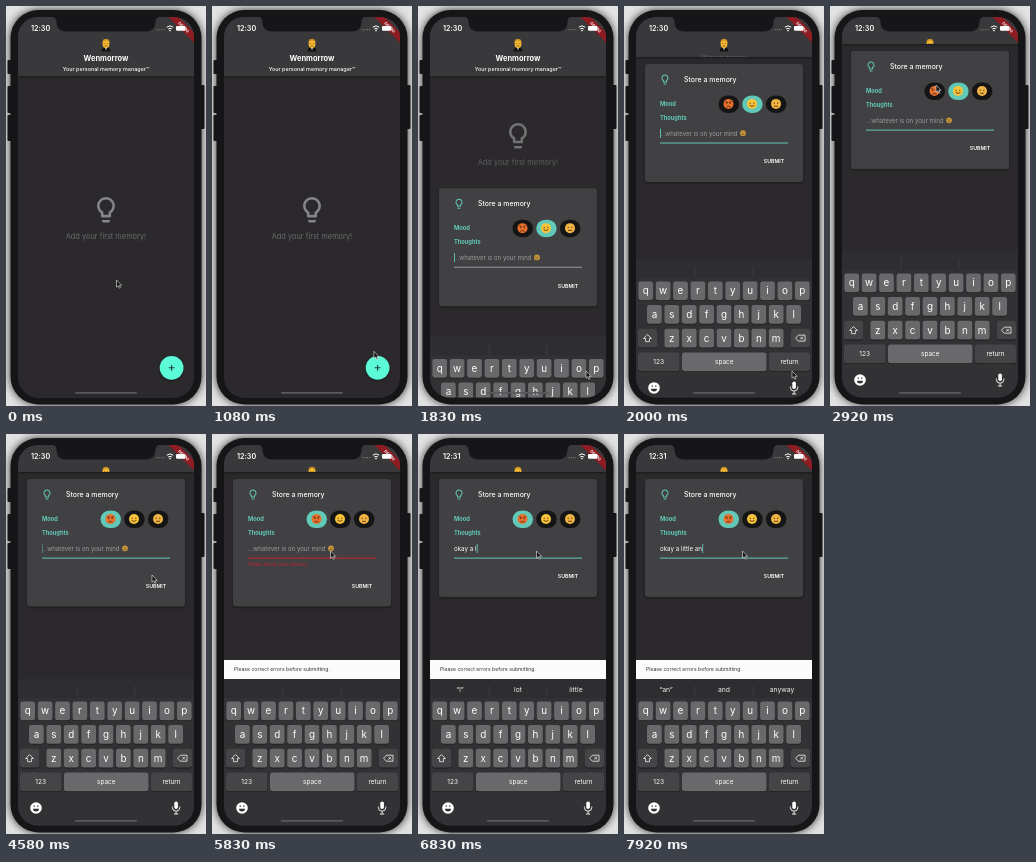
An HTML page for the animation above (8 s loop, 200 px wide and 400 px high).

```html
<!DOCTYPE html>
<html lang="en">
<head>
<meta charset="utf-8">
<title>Memory manager</title>
<style>
  html, body { margin: 0; width: 100%; height: 100%; overflow: hidden; background: #e2e2e2; }
  svg { display: block; width: 100vw; height: 100vh; }
  text { font-family: Inter, Roboto, sans-serif; white-space: pre; }
</style>
</head>
<body>
<svg id="stage" viewBox="0 0 200 400"></svg>
<script>
const TEAL = '#62c9b8', BODY = '#2b292b', BAR = '#39383a', RED = '#c9252d', CASE = '#161517';
const BULB = 'M9 21c0 .55.45 1 1 1h4c.55 0 1-.45 1-1v-1H9v1zm3-19C8.14 2 5 5.14 5 9c0 2.38 1.19 4.47 3 5.74V17c0 .55.45 1 1 1h6c.55 0 1-.45 1-1v-2.26c1.81-1.27 3-3.36 3-5.74 0-3.86-3.14-7-7-7zm2.85 11.1l-.85.6V16h-4v-2.3l-.85-.6C7.8 12.16 7 10.63 7 9c0-2.76 2.24-5 5-5s5 2.24 5 5c0 1.63-.8 3.16-2.15 4.1z';

// Text is placed by the middle of its capitals
const text = (x, mid, size, str, fill = '#fff', more = '') =>
  `<text x="${x}" y="${mid + size * .36}" font-size="${size}" fill="${fill}" ${more}>${str}</text>`;
const MID = 'text-anchor="middle" ', BOLD = 'font-weight="700" ', SEMI = 'font-weight="600" ';
const rect = (x, y, w, h, fill, r = 0, more = '') =>
  `<rect x="${x}" y="${y}" width="${w}" height="${h}" rx="${r}" fill="${fill}" ${more}/>`;
const bulb = (x, y, s, fill) =>
  `<path d="${BULB}" fill="${fill}" transform="translate(${x} ${y}) scale(${s}) translate(-12 -12)"/>`;

const face = (x, y, r, fill, mouth, brows = '') =>
  `<g transform="translate(${x} ${y}) scale(${r / 5})" stroke="#4a2508" stroke-width=".8" fill="none" stroke-linecap="round">
    <circle r="5" fill="${fill}" stroke="none"/>
    <path d="M-1.8 -1v.7M1.8 -1v.7${mouth}${brows}"/></g>`;
const SMILE = 'M-2.2 1.6Q0 3.6 2.2 1.6', FROWN = 'M-1.8 3Q0 1.4 1.8 3', FLAT = 'M-1.6 2.3H1.6';

const MOODS = [
  face(104.5, 40, 5, '#e8702f', FROWN, 'M-3 -2.4L-1 -1.4M3 -2.4L1 -1.4'),
  face(128, 40, 5, '#f9c53b', SMILE),
  face(152, 40, 5, '#f0b545', FLAT)
];
const pills = MOODS.map((m, i) =>
  rect(94.5 + 23.7 * i, 31.5, 20.5, 17.5, '#161516', 8.7) +
  rect(94.5 + 23.7 * i, 31.5, 20.5, 17.5, TEAL, 8.7, `id="pill${i}" opacity="0"`) + m).join('');

function keyboard() {
  const key = (x, y, w, label, size, fill = '#69686a') =>
    rect(x, y + .8, w, 18.8, '#1c1b1c', 2.4) + rect(x, y, w, 18.8, fill, 2.4) +
    text(x + w / 2, y + 9.2, size, label, '#fff', MID);
  const row = (letters, x, y) =>
    [...letters].map((c, i) => key(x + i * 17.4, y, 14.8, c, 9.9)).join('');
  const DARK = '#454446';
  return rect(12, 245, 176, 160, '#323133') + rect(12, 245, 176, 19, '#2e2d2f') +
    '<path d="M71 252v11M129 252v11" stroke="#454446" stroke-width=".7"/>' +
    [42, 100, 158].map((x, i) =>
      text(x, 256, 6.8, '', '#f2f2f2', `${MID} id="hint${i}"`)).join('') +
    row('qwertyuiop', 14.3, 267.5) + row('asdfghjkl', 23, 291) + row('zxcvbnm', 40.4, 314.8) +
    key(14, 314.8, 19, '', 6, DARK) + key(167, 314.8, 19, '', 6, DARK) +
    key(14, 338.5, 41.5, '123', 6.6, DARK) + key(58, 338.5, 84.5, 'space', 6.4) +
    key(145, 338.5, 41, 'return', 6.4, DARK) +
    `<g fill="none" stroke="#fff" stroke-width=".75" stroke-linejoin="round">
      <path d="M23.5 320.6l3.9 3.9h-2v3.2h-3.8v-3.2h-2z"/>
      <path d="M171.6 324.2l2.8-3h6.6v6h-6.6zM176.3 322.8l2.8 2.8M179.1 322.8l-2.8 2.8"/>
    </g>
    <circle cx="30" cy="374" r="5.8" fill="#fff"/>
    <path d="M28.2 371.4v1.6M31.8 371.4v1.6" stroke="#323133" stroke-width="1"/>
    <path d="M27 374.8h6a3 2.7 0 0 1-6 0z" fill="#323133"/>
    <rect x="168.3" y="367.5" width="3.6" height="7.6" rx="1.8" fill="#fff"/>
    <path d="M166.4 372.5v1a3.7 3.7 0 0 0 7.4 0v-1M170.1 377.3v2.6M168 380h4.2" fill="none" stroke="#fff" stroke-width=".9"/>`;
}

const butler = `<g transform="translate(100 39)">
  <path d="M-4.4 6.6Q-4.4 3 -1.6 2.6h3.2Q4.4 3 4.4 6.6z" fill="#121112"/>
  <path d="M-1 2.6h2L0 5.4z" fill="#ddd"/>
  <ellipse cy="-1.4" rx="3.4" ry="4.6" fill="#f2b733"/>
  <path d="M-3.5 -2.2Q-3.6 -6.2 0 -6.2T3.5 -2.2Q2.4 -4.8 0 -4.8T-3.5 -2.2z" fill="#c58a25"/>
  <path d="M-1.4 -2v.8M1.4 -2v.8M-1.2 .9h2.4" stroke="#5a340c" stroke-width=".7"/></g>`;

const card = `<g id="card">
  <rect id="sheet" x="21" y="0" width="158" height="118" rx="3" fill="#414042" filter="url(#soft)"/>
  ${bulb(41, 15.5, .5, TEAL)}
  ${text(60, 15.8, 6.95, 'Store a memory', '#fff', 'font-weight="500"')}
  ${text(36, 39.8, 5.7, 'Mood', TEAL, BOLD)}${pills}
  ${text(36, 54.3, 5.7, 'Thoughts', TEAL, BOLD)}
  <g id="empty">${text(36, 69.6, 6.1, '...whatever is on your mind', '#9b9a9c')}
    ${face(119, 69.3, 2.9, '#c99a3c', FLAT)}</g>
  ${text(36, 69.6, 6.2, '', '#fff', 'id="typed"')}
  <rect id="caret" x="36" y="65" width=".9" height="9" fill="${TEAL}"/>
  <rect id="line" x="36" y="78.6" width="128" height="1"/>
  ${text(36, 85.8, 4.5, 'Please tell me your memory.', RED, 'id="error"')}
  <g id="submit">${text(150, 97.6, 5.2, 'SUBMIT', '#fff', MID + SEMI)}</g>
</g>`;

const status = `
  <path d="M162.5 11h10L188 26.5V36.5z" fill="#8f1c22"/>
  ${text(0, 0, 3.8, 'DEBUG', '#fff', MID + BOLD + 'transform="translate(177.7 21.3) rotate(45)"')}
  ${text(25, 22.4, 7.2, '12:30', '#fff', SEMI + 'id="clock"')}
  <path d="M150.5 23.6h8" stroke="#777" stroke-width="1.1" stroke-dasharray="1.1 1.1"/>
  <path d="M160.8 21.2q3.2-2.8 6.4 0M162.2 23q1.8-1.5 3.6 0" stroke="#fff" stroke-width="1" fill="none"/>
  <circle cx="164" cy="24.6" r=".8" fill="#fff"/>
  ${rect(170, 20, 9.5, 4.8, '#fff', 1.2)}${rect(180, 21.5, .8, 1.8, '#ccc', .3)}
  ${rect(69, 386, 62, 1.8, '#59585a', .9)}`;

const sideButtons = [[1.5, 54, 14], [1.5, 80, 27], [1.5, 109, 26], [193, 79, 44]]
  .map(([x, y, h]) => rect(x, y, 5.5, h, CASE, 1)).join('');

stage.innerHTML = `
<defs>
  <clipPath id="screen"><rect x="12" y="11" width="176" height="380.5" rx="20"/></clipPath>
  <clipPath id="barClip"><rect id="barArea" x="12" y="11" width="176" height="59"/></clipPath>
  <filter id="soft" x="-10%" y="-10%" width="120%" height="125%" color-interpolation-filters="sRGB">
    <feDropShadow dx="0" dy="1" stdDeviation="1.2" flood-opacity=".4"/></filter>
  <filter id="glow" x="-10%" y="-10%" width="120%" height="120%" color-interpolation-filters="sRGB">
    <feDropShadow dx="0" dy="0" stdDeviation="4" flood-opacity=".8"/></filter>
</defs>
${rect(4.5, 4, 191, 394.5, CASE, 28, 'filter="url(#glow)"')}
${sideButtons}
<g clip-path="url(#screen)">
  ${rect(12, 11, 176, 381, BODY)}
  <g id="intro">${bulb(100, 203.7, 1.28, '#858486')}
    ${text(100, 230, 7.4, 'Add your first memory!', '#6b6a6c', MID)}</g>
  ${card}
  <rect id="bar" x="12" y="0" width="176" height="70" fill="${BAR}" filter="url(#soft)"/>
  <g clip-path="url(#barClip)">${butler}
    <g id="title">${text(100, 52, 7.5, 'Wenmorrow', '#fff', MID + BOLD)}
    ${text(100, 62.8, 5.45, 'Your personal memory manager™', '#fff', MID + 'font-weight="500"')}</g></g>
  <g id="fab"><circle cx="165.6" cy="361.8" r="11.9" fill="#5cfbd8" filter="url(#soft)"/>
    <path d="M162.7 361.8h5.8M165.6 358.9v5.8" stroke="#16403a" stroke-width="1.1"/></g>
  <g id="snack">${rect(12, 226, 176, 19.5, '#fcfbfc')}
    ${text(22, 235.6, 5.1, 'Please correct errors before submitting.', '#333')}</g>
  <g id="keys">${keyboard()}</g>
  ${status}
</g>
<path d="M45 10.5q5.5 .5 5.5 5.5q0 9.5 10 9.5h79q10 0 10-9.5q0-5 5.5-5.5z" fill="${CASE}"/>
<path id="mouse" d="M0 0v7.2l1.7-1.5 1.1 2.5 1.2-.5-1.1-2.4h2.2z" fill="#111" stroke="#eee" stroke-width=".6"/>`;

const $ = id => document.getElementById(id);
const set = (id, name, value) => $(id).setAttribute(name, value);
const shift = (id, x, y) => set(id, 'transform', `translate(${x} ${y})`);
const clamp = (v, lo, hi) => Math.min(hi, Math.max(lo, v));
const ramp = (t, from, to) => { const p = clamp((t - from) / (to - from), 0, 1); return p * p * (3 - 2 * p); };

// Linear track of [time, value, ...] rows
function track(t, rows, col = 1) {
  const i = rows.findIndex(r => r[0] > t);
  if (i < 0) return rows[rows.length - 1][col];
  if (!i) return rows[0][col];
  const a = rows[i - 1], b = rows[i];
  return a[col] + (b[col] - a[col]) * (t - a[0]) / (b[0] - a[0]);
}

const MOUSE = [[0, 110.5, 274], [79, 110.5, 274], [90, 113, 278], [420, 113, 278], [800, 146, 318],
  [1170, 167, 354], [1420, 168, 365], [2060, 168, 365], [2420, 130, 112], [2900, 106, 79],
  [3300, 106, 79], [4080, 140, 125], [4330, 146, 141], [4650, 146, 141], [4960, 132, 124], [5330, 118.5, 117]];
const CARD = [[1670, 340], [1750, 255], [1830, 183], [1920, 105], [2000, 58], [2100, 49], [2300, 45]];
const KEYS = [[1670, 146], [1750, 128], [1830, 86], [1920, 30], [2000, 8], [2080, 3], [2200, 0]];
const INTRO = [[1670, 0], [1750, -34], [1830, -73.5], [1940, -130]];

const MEMO = 'okay a little an';
const GUESS = { o: ['of', 'on'], ok: ['okay', 'OK'], oka: ['okay', 'Oka'], okay: ['so', 'then'],
  a: ['and', 'are'], l: ['lot', 'little'], li: ['like', 'little'], lit: ['little', 'literally'],
  litt: ['little', 'litter'], littl: ['little', 'littlest'], little: ['bit', 'more'], an: ['and', 'anyway'] };

function draw(t) {
  shift('mouse', track(t, MOUSE, 1), track(t, MOUSE, 2));

  const y = track(t, CARD), barEnd = clamp(y - 7, 38, 70);
  shift('card', 0, y);
  set('card', 'opacity', ramp(t, 1670, 1800));
  set('bar', 'height', barEnd);
  set('barArea', 'height', barEnd - 11);
  set('title', 'opacity', ramp(barEnd, 44, 70));
  shift('keys', 0, track(t, KEYS));
  shift('intro', 0, track(t, INTRO));
  set('intro', 'opacity', 1 - ramp(t, 1780, 1960));
  set('fab', 'opacity', 1 - ramp(t, 1660, 1780));

  const angry = ramp(t, 3000, 3200);
  set('pill0', 'opacity', angry);
  set('pill1', 'opacity', 1 - angry);

  const gap = 9.5 * (ramp(t, 4420, 4570) - ramp(t, 6000, 6180));
  set('sheet', 'height', 118 + gap);
  shift('submit', 0, gap);
  set('error', 'opacity', ramp(t, 4580, 4760) - ramp(t, 5940, 6060));
  const wrong = t > 4620 && t < 5980;
  set('line', 'fill', wrong ? RED : t < 1900 ? '#8f9a99' : TEAL);
  set('snack', 'visibility', t > 4600 ? 'visible' : 'hidden');
  shift('snack', 0, 20 * (1 - ramp(t, 4600, 4860)));

  const memo = MEMO.slice(0, clamp(Math.floor((t - 5920) / 130) + 1, 0, MEMO.length));
  $('typed').textContent = memo;
  set('empty', 'opacity', memo ? 0 : 1);
  set('caret', 'x', 36 + (memo ? $('typed').getComputedTextLength() + .3 : 0));
  const beat = t % 1200;
  set('caret', 'opacity', memo ? 1 : ramp(beat, 540, 600) - ramp(beat, 950, 1010));

  const word = memo.trim().split(' ').pop(), guess = GUESS[word];
  [guess ? `“${word}”` : '', ...(guess || ['', ''])].forEach((w, i) => $('hint' + i).textContent = w);
  $('clock').textContent = t < 6500 ? '12:30' : '12:31';
}

const start = performance.now();
function tick() {
  draw((performance.now() - start) % 8000);
  requestAnimationFrame(tick);
}
tick();
</script>
</body>
</html>
```
